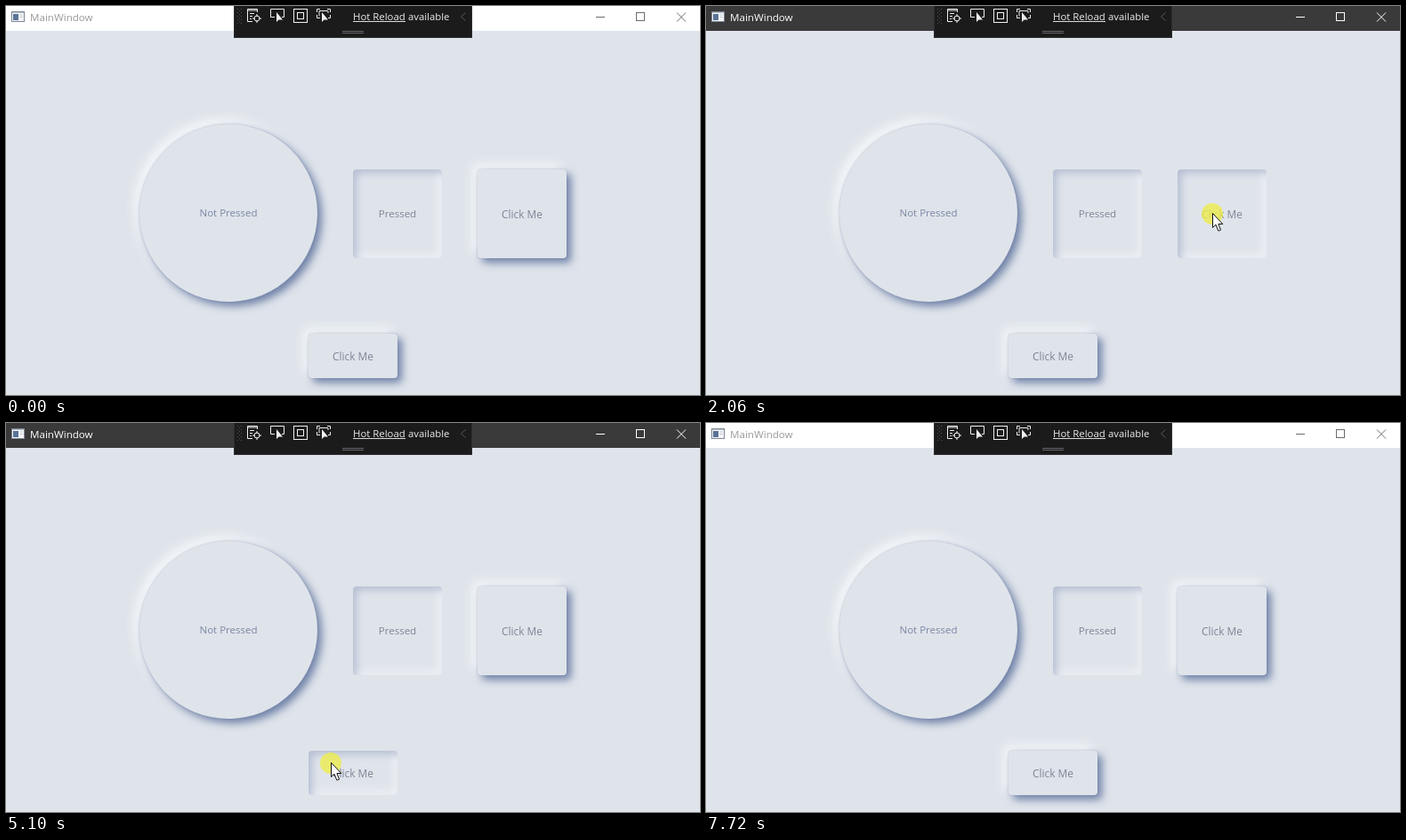
These frames come from a looping animation (780 by 438 pixels, 7890 ms). An HTML page:

```html
<!DOCTYPE html>
<html lang="en">
<head>
<meta charset="utf-8">
<title>Soft buttons</title>
<style>
  :root {
    --up: 0 0 2px rgba(110, 125, 160, .45), 5px 5px 10px rgba(92, 112, 155, .85), -6px -6px 12px rgba(247, 249, 251, .9);
    --down: inset 5px 5px 9px -1px rgba(160, 172, 196, .65), inset -5px -5px 8px rgba(240, 243, 247, .75);
    --loop: 7890ms step-end infinite;
  }
  html, body { margin: 0; width: 100%; height: 100%; overflow: hidden; }
  body { font: 11.5px "Open Sans", "Noto Sans", sans-serif; }
  #stage { position: absolute; left: 0; top: 0; width: 780px; height: 438px; overflow: hidden; background: #dfe4eb; }
  svg { position: absolute; left: 0; top: 0; overflow: visible; }

  .soft {
    position: absolute; width: 100px; height: 100px; top: 184px;
    display: flex; align-items: center; justify-content: center;
    border-radius: 4px; background: #dfe4eb; color: #7e8594;
    box-shadow: var(--up); white-space: nowrap;
  }
  .soft span { position: relative; top: -.5px; }
  .disc { left: 150px; top: 133px; width: 200px; height: 200px; border-radius: 50%; color: #7b86a4; }
  .sunk { left: 390px; box-shadow: var(--down); }
  .square { left: 530px; font-size: 11.9px; animation: press-square var(--loop); }
  .wide { left: 340px; top: 369px; height: 50px; font-size: 11.9px; animation: press-wide var(--loop); }

  #title { position: absolute; width: 780px; height: 28px; background: #fff; color: #999; animation: focus var(--loop); }
  #controls { color: #6c6c6c; animation: glyphs var(--loop); }
  #cursor { animation: move var(--loop); }
  #halo { opacity: 0; animation: halo var(--loop); }

  @keyframes focus {
    0%, 97.84% { background: #fff; color: #999; }
    14.32% { background: #3a3a3a; color: #fff; }
  }
  @keyframes glyphs {
    0%, 97.84% { color: #6c6c6c; }
    14.32% { color: #fff; }
  }
  @keyframes press-square {
    0%, 21.29%, 38.91% { box-shadow: var(--up); }
    14.32%, 26.1% { box-shadow: var(--down); }
  }
  @keyframes press-wide {
    0%, 61.72%, 76.42% { box-shadow: var(--up); }
    52.85%, 64.63% { box-shadow: var(--down); }
  }
  @keyframes halo {
    0%, 21.29%, 39.92%, 61.72%, 76.42% { opacity: 0; }
    14.32%, 26.1%, 52.85%, 64.63% { opacity: 1; }
  }
  @keyframes move {
    0%, 94.04% { transform: translate(820px, 480px); }
    /* in from below, to the square button */
    1.52% { transform: translate(659px, 424px); }
    2.53% { transform: translate(598px, 343px); }
    3.42% { transform: translate(552px, 284px); }
    4.43% { transform: translate(537px, 268px); }
    8.49% { transform: translate(541px, 264px); }
    9.5% { transform: translate(553px, 251px); }
    10.39% { transform: translate(565px, 237px); }
    11.4% { transform: translate(569px, 233px); }
    /* down to the wide button */
    41.82% { transform: translate(562px, 243px); }
    42.83% { transform: translate(541px, 275px); }
    43.85% { transform: translate(505px, 316px); }
    44.86% { transform: translate(468px, 345px); }
    45.88% { transform: translate(426px, 366px); }
    46.76% { transform: translate(391px, 378px); }
    47.78% { transform: translate(370px, 382px); }
    48.79% { transform: translate(365px, 382px); }
    /* arc over the middle, then out */
    80.35% { transform: translate(360px, 372px); }
    81.36% { transform: translate(348px, 335px); }
    82.25% { transform: translate(342px, 285px); }
    83.27% { transform: translate(358px, 232px); }
    84.28% { transform: translate(402px, 200px); }
    85.17% { transform: translate(463px, 192px); }
    86.18% { transform: translate(560px, 222px); }
    87.19% { transform: translate(642px, 282px); }
    88.21% { transform: translate(678px, 323px); }
    91.12% { transform: translate(683px, 333px); }
    92.14% { transform: translate(702px, 368px); }
    93.02% { transform: translate(730px, 420px); }
  }
</style>
</head>
<body>
<div id="stage">
  <div class="soft disc"><span>Not Pressed</span></div>
  <div class="soft sunk"><span>Pressed</span></div>
  <div class="soft square"><span>Click Me</span></div>
  <div class="soft wide"><span>Click Me</span></div>

  <div id="title">
    <svg width="780" height="28">
      <rect x="6.5" y="6.5" width="14" height="11" fill="#f4f6f8" stroke="#7c8694"/>
      <path d="M7 7.5H20" stroke="#b8c0ca"/>
      <rect x="8" y="9" width="6" height="7" fill="#5a7396"/>
      <path d="M15.5 10H19M15.5 12.5H19" stroke="#c3c9d1"/>
      <text x="27" y="17" fill="currentColor" font-size="11.6">MainWindow</text>
      <g id="controls" fill="none" stroke="currentColor">
        <path d="M663 12.5H673"/>
        <rect x="708.5" y="7.5" width="9" height="9"/>
        <path d="M754 7.5L764 17.5M764 7.5L754 17.5"/>
      </g>
    </svg>
  </div>

  <svg width="780" height="40" fill="none" stroke="#f0f0f0">
    <path d="M256 0H524V36H256Z" fill="#1b1b1c" stroke="none"/>
    <path d="M256.5 0V35.5H523.5V0" stroke="#2f2f33"/>
    <path d="M260.5 3V21M264.5 3V21" stroke="#55555a" stroke-dasharray="1 3"/>
    <path d="M262.5 5V21" stroke="#55555a" stroke-dasharray="1 3"/>
    <!-- document with a sight -->
    <path d="M277 17.5H271.5V3.5H282.5V7M271.5 5H282.5M274 8.5H279M274 11.5H277M274 14.5H276"/>
    <circle cx="282" cy="14" r="3"/>
    <path d="M282 9V12M282 16V19M277 14H280M284 14H287"/>
    <!-- box with a pointer -->
    <path d="M302 12.5H297.5V3.5H312.5V12.5H310"/>
    <path d="M304 7V18L306.500 15.500H311Z" fill="#f0f0f0" stroke="none"/>
    <!-- nested boxes -->
    <rect x="323.500" y="3.500" width="15" height="15"/>
    <rect x="327.500" y="7.500" width="7" height="7"/>
    <!-- brackets with a pointer -->
    <path d="M349.500 7V3.500H353M361 3.500H364.500V7M349.500 10V13.500H353M362 13.500H364.500V10M352 5.500H362V8M352 5.500V11.500"/>
    <path d="M355 7V18L357.500 15.500H362Z" fill="#f0f0f0" stroke="none"/>
    <g fill="#ececec" stroke="none">
      <text x="390" y="16" font-size="11.4">Hot Reload</text>
      <text x="452" y="16" font-size="11.3">available</text>
    </g>
    <path d="M390 17.500H449" stroke="#dcdcdc"/>
    <path d="M516.500 7.500L511.500 12L516.500 16.500" stroke="#58585c"/>
    <path d="M378 28.500H402M378 30.500H402" stroke="#66666a"/>
  </svg>

  <svg id="cursor" width="12" height="21">
    <circle id="halo" cx="0" cy="1" r="12" fill="#ecec4e" fill-opacity=".8"/>
    <path d="M.5 .5V16.500L4 13.200L6.700 20H7.700L9.500 19.200L6.900 12.500H11.800Z" fill="#fff" stroke="#111"/>
  </svg>
</div>
</body>
</html>
```
